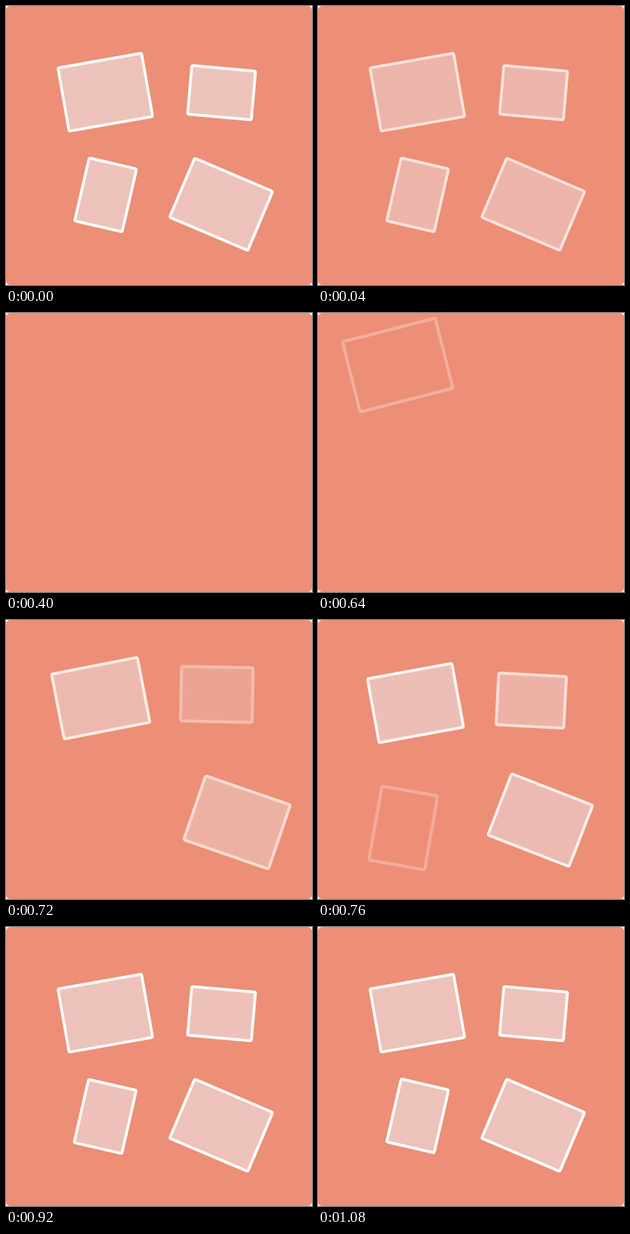
Write an HTML page that moves like this. It is 440 by 400 pixels and loops after 2580 ms.

```html
<!DOCTYPE html>
<html lang="en">
<head>
<meta charset="utf-8">
<title>Cards</title>
<style>
  html, body { margin: 0; width: 100%; height: 100%; overflow: hidden; background: #fff; }
  svg { display: block; width: 440px; height: 400px; }
  .card rect { fill: #edc2bb; stroke: #fff; stroke-width: 4; }
</style>
</head>
<body>
<svg id="stage" viewBox="0 0 440 400">
  <rect width="440" height="400" rx="6" fill="#ed8e76"/>
</svg>
<script>
  const LOOP = 2580, STEP = 40, FADE = 160, ENTER = 340;
  const NS = 'http://www.w3.org/2000/svg';
  const stage = document.getElementById('stage');

  // Resting place, plus the offset, turn and growth each card arrives from.
  const cards = [
    { x: 142.8, y: 123.6, w: 126, h: 96, angle: -10, start: 617, dx: -40, dy: -69.5, turn: -6, grow: 0.18 },
    { x: 310, y: 124.3, w: 96, h: 74, angle: 5, start: 686, dx: -11.5, dy: -30, turn: -6.6, grow: 0.2 },
    { x: 143.3, y: 270.8, w: 74, h: 96.5, angle: 13, start: 740, dx: -28, dy: 37, turn: -4, grow: 0.22 },
    { x: 309.4, y: 284.3, w: 126, h: 96, angle: 23, start: 651, dx: 71, dy: 18, turn: -12.5, grow: 0.17 }
  ];

  for (const c of cards) {
    c.group = document.createElementNS(NS, 'g');
    c.group.setAttribute('class', 'card');
    c.rect = document.createElementNS(NS, 'rect');
    const box = { x: 2 - c.w / 2, y: 2 - c.h / 2, width: c.w - 4, height: c.h - 4, rx: 2 };
    for (const key in box) c.rect.setAttribute(key, box[key]);
    c.group.append(c.rect);
    stage.append(c.group);
  }

  function place(c, left, opacity, filled) {
    const x = c.x + c.dx * left, y = c.y + c.dy * left;
    c.group.setAttribute('transform',
      `translate(${x} ${y}) rotate(${c.angle + c.turn * left}) scale(${1 + c.grow * left})`);
    c.group.setAttribute('opacity', opacity);
    c.rect.setAttribute('fill-opacity', filled ? 1 : 0);
  }

  function draw(t) {
    for (const c of cards) {
      if (t < FADE) {
        place(c, 0, 1 - t / FADE, true);
      } else {
        const p = Math.min(1, Math.max(0, (t - c.start) / ENTER));
        const left = (1 - p) ** 5;
        // The faintest stage shows only the outline.
        place(c, left, 1 - left, left < 0.65);
      }
    }
  }

  const begin = performance.now();
  function tick() {
    const t = (performance.now() - begin) % LOOP;
    draw(Math.floor(t / STEP) * STEP);
    requestAnimationFrame(tick);
  }
  tick();
</script>
</body>
</html>
```
